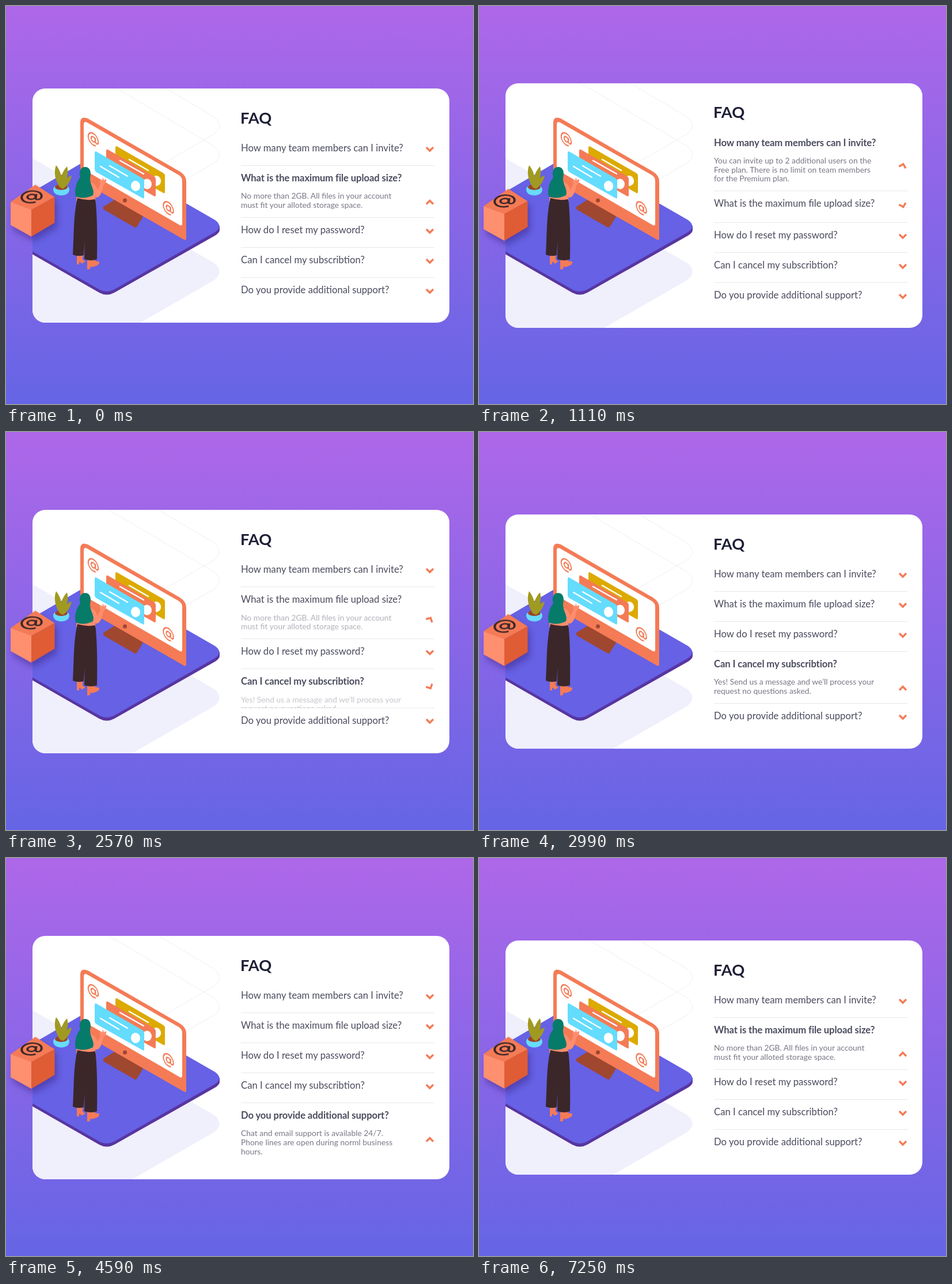
An HTML page for the animation above (7.42 s loop, 811 by 690 pixels).

```html
<!DOCTYPE html>
<html lang="en">
<head>
<meta charset="utf-8">
<title>FAQ accordion</title>
<style>
html, body { margin: 0; width: 100%; height: 100%; overflow: hidden; }
body {
  position: relative;
  font-family: Lato, "Open Sans", sans-serif;
  background: linear-gradient(#ae67e9, #6565e5);
}
.stage {
  position: absolute; left: 0; top: 0; width: 811px; height: 692px;
  display: flex; align-items: center;
}
.card {
  position: relative; width: 724px; margin-left: 46px; padding: 82px 0 26px;
  box-sizing: border-box; border-radius: 22px; background: #fff; overflow: hidden;
}
.art { position: absolute; left: -46px; top: calc(50% - 346px); }
h1 {
  position: absolute; left: 361px; top: 30.5px; margin: 0;
  font-size: 27.3px; line-height: 40px; font-weight: 700; color: #1e1f36;
}
.item {
  --e: 0; --turn: 0;
  position: relative; margin-left: 362px; width: 336px; height: 52px;
  box-sizing: border-box; border-bottom: 1px solid #e8e8ea; overflow: hidden;
}
.item:last-child { border-color: transparent; }
h2 {
  position: absolute; left: 0; top: 10px; margin: 0; white-space: nowrap;
  font-size: 16.7px; line-height: 22px; font-weight: 400; color: #4a4b5e;
}
.open h2 { font-weight: 700; letter-spacing: -.12px; }
.item p {
  position: absolute; left: 0; top: 44.2px; margin: 0; white-space: pre;
  font-size: 13.85px; line-height: 15.6px; color: #787887; opacity: 0;
}
.item svg {
  position: absolute; right: -2px; top: 12.5px; overflow: visible;
  transform: translateY(calc(var(--e) * 40.5px)) rotate(calc(var(--turn) * -180deg));
}
.cube {
  position: absolute; left: 0; top: 0; overflow: visible;
  filter: drop-shadow(4px 8px 6px rgba(50, 25, 110, .42));
  animation: bob 2473.33ms cubic-bezier(.1, .6, .2, 1) -2346.33ms infinite;
}
@keyframes bob {
  0%, 100% { transform: translateY(-.3px); }
  50% { transform: translateY(7px); }
}
</style>
</head>
<body>
<div class="stage">
  <main class="card">
    <svg class="art" width="811" height="692">
      <defs>
        <g id="at" fill="none" stroke-width="2.3">
          <circle r="4.2"/>
          <path d="M4.2-4.6V1.5C4.2 6 10 5.5 10 0A10 10 0 1 0 5 8.7"/>
        </g>
        <g id="panel">
          <path d="M3 .5L83 46.500Q86 48.500 86 51V79Q86 83 83 81L3 36Q0 34 0 31V3Q0-1 3 .5Z"/>
          <ellipse cx="71" cy="60" rx="8" ry="9" fill="#fff" transform="rotate(-12 71 60)"/>
        </g>
      </defs>

      <path fill="#f0effc" d="M40 260.500L362 446Q379 460 362 475L200 568 40 660Z"/>
      <g fill="none" stroke="#efeff3">
        <path id="wire" d="M190 91L361 192Q380 208 361 222L232 297"/>
        <use href="#wire" y="50.500"/>
        <path d="M150 119.500L190 143"/>
      </g>

      <path fill="#5835a0" d="M40 420V427L162 497Q175 504 188 497L363 398Q371 393 371 388V381Z"/>
      <path fill="#6661e5" d="M40 325.500L161 255 363 371Q378 382 363 392L187 492Q175 498 163 492L40 422Z"/>

      <path fill="#a0472f" d="M190 335L238 362 237 367 227 383Q225 385 222 383L170 353Q168 351 169 348Z"/>
      <path fill="#f47b56" d="M129 201Q130 190 142 195L302 287Q313 294 313 304V403Q313 407 309 405L132 304Q129 302 129 298Z"/>
      <path fill="#fff" d="M135 206Q135 199 141 202L300 293Q306 297 306 303V377Q306 382 302 380L139 286Q135 284 135 280Z"/>
      <circle cx="206.500" cy="337" r="3.500" fill="#a0472f"/>
      <use href="#at" stroke="#f47b56" transform="matrix(.87 .5 0 1 151.500 231)"/>
      <use href="#at" stroke="#f47b56" transform="matrix(.87 .5 0 1 282 350.500)"/>
      <use href="#panel" x="190" y="243" fill="#dcaa00"/>
      <path d="M214 266L247 285" stroke="#fff" stroke-width="2.500" stroke-linecap="round"/>
      <use href="#panel" x="174" y="248.500" fill="#f47b56"/>
      <path d="M198 268L239 291" stroke="#fff" stroke-width="2.500" stroke-linecap="round"/>
      <use href="#panel" x="154" y="252" fill="#64dcfd"/>
      <path d="M180 277L211 295M164 278L196 297" stroke="#fff" stroke-width="2.200" stroke-linecap="round"/>

      <path fill="#68dcfb" d="M82 318C82 307 110 307 110 318 110 332 82 332 82 318Z"/>
      <ellipse cx="96" cy="314" rx="11" ry="5" fill="#9a4529"/>
      <g fill="#a19a20">
        <path d="M94 315C86 304 82 289 87 276 95 285 99 301 97 315Z"/>
        <path d="M95 315C93 299 98 286 106 278 110 291 104 306 98 315Z"/>
        <path d="M96 316C98 305 104 297 114 294 112 305 105 313 99 317Z"/>
      </g>

      <g fill="#f47b56">
        <path d="M123 432L134 433Q130 439 138 443L131 447Q130 443 127 444V448H123Z"/>
        <path d="M141 439H152Q154 443 162 443Q163 449 155 451L149 453Q147 449 146 456L141 457Z"/>
      </g>
      <g fill="#ff8d6e">
        <path d="M123 326H154L156 338H122Z"/>
        <path d="M146 305C153 306 157 313 159 319L164 308Q161 302 164 301L167 303 168 297 170 302 174 300Q175 306 169 311C167 321 164 331 158 332 151 333 145 325 145 318Z"/>
      </g>
      <path fill="#3b2729" d="M124 333Q140 338 155 335C158 354 159 400 158 439Q148 443 136 439L136.500 408 135 432Q125 435 116 431C118 398 117 362 124 333Z"/>
      <path fill="#067b69" d="M137 279C129 279 126 288 129 297 123 304 118 318 121 330 132 335 144 332 151 328 155 319 145 309 146 298 149 286 145 279 137 279Z"/>
    </svg>
    <h1>FAQ</h1>
    <div id="list"></div>
  </main>
  <svg class="cube" width="100" height="440">
    <path fill="#f47b56" d="M51 310L84.500 331.500 44 354 8 340Z"/>
    <path fill="#ff906f" d="M8 340L44 353.500V400L8 380Z"/>
    <path fill="#e05c35" d="M84.500 331.500L44 353.500V400L84.500 376Z"/>
    <use href="#at" stroke="#3b2729" transform="matrix(1.720 0 -.2 1.020 44.500 331)"/>
  </svg>
</div>
<script>
const LOOP = 7420, SLIDE = 300, TURN = 350, FADE = 180, CLOSED = 52, MAX = 80;
const faq = [
  ['How many team members can I invite?',
   'You can invite up to 2 additional users on the\nFree plan. There is no limit on team members\nfor the Premium plan.'],
  ['What is the maximum file upload size?',
   'No more than 2GB. All files in your account\nmust fit your alloted storage space.'],
  ['How do I reset my password?', ''],
  ['Can I cancel my subscribtion?',
   'Yes! Send us a message and we’ll process your\nrequest no questions asked.'],
  ['Do you provide additional support?',
   'Chat and email support is available 24/7.\nPhone lines are open during norml business\nhours.']
];
// [time, opened item]
const clicks = [[-TURN, 1], [885, 0], [1840, 1], [2525, 3], [3345, 4], [6800, 1]];

const items = faq.map(([question, answer]) => {
  const el = document.createElement('div');
  el.className = 'item';
  el.innerHTML = `<h2>${question}</h2><p>${answer}</p>
    <svg width="20" height="20"><path d="M4 7l6 6 6-6" fill="none" stroke="#f47b56" stroke-width="3.4"/></svg>`;
  document.getElementById('list').append(el);
  const extra = 7 + 15.5 * answer.split('\n').length;
  return { el, text: el.querySelector('p'), extra };
});

// CSS "ease": cubic-bezier(.25, .1, .25, 1)
function ease(x) {
  if (x <= 0) return 0;
  if (x >= 1) return 1;
  const curve = (a, b, s) => 3 * a * s * (1 - s) ** 2 + 3 * b * s * s * (1 - s) + s ** 3;
  let lo = 0, hi = 1;
  for (let i = 0; i < 24; i++) {
    const mid = (lo + hi) / 2;
    if (curve(.25, .25, mid) < x) lo = mid; else hi = mid;
  }
  return curve(.1, 1, lo);
}

function draw() {
  const t = performance.now() % LOOP;
  const k = clicks.filter(c => c[0] <= t).length - 1;
  const [start, open] = clicks[k];
  const last = k ? clicks[k - 1][1] : -1;
  const level = (i, span) => {
    const e = ease((t - start) / span);
    return i === open ? e : i === last ? 1 - e : 0;
  };
  items.forEach(({ el, text, extra }, i) => {
    const e = level(i, SLIDE);
    el.classList.toggle('open', i === open);
    el.style.setProperty('--e', e);
    el.style.setProperty('--turn', level(i, TURN));
    el.style.height = CLOSED + Math.min(extra, MAX * e) + 'px';
    text.style.opacity = level(i, FADE);
  });
  requestAnimationFrame(draw);
}
draw();
</script>
</body>
</html>
```
